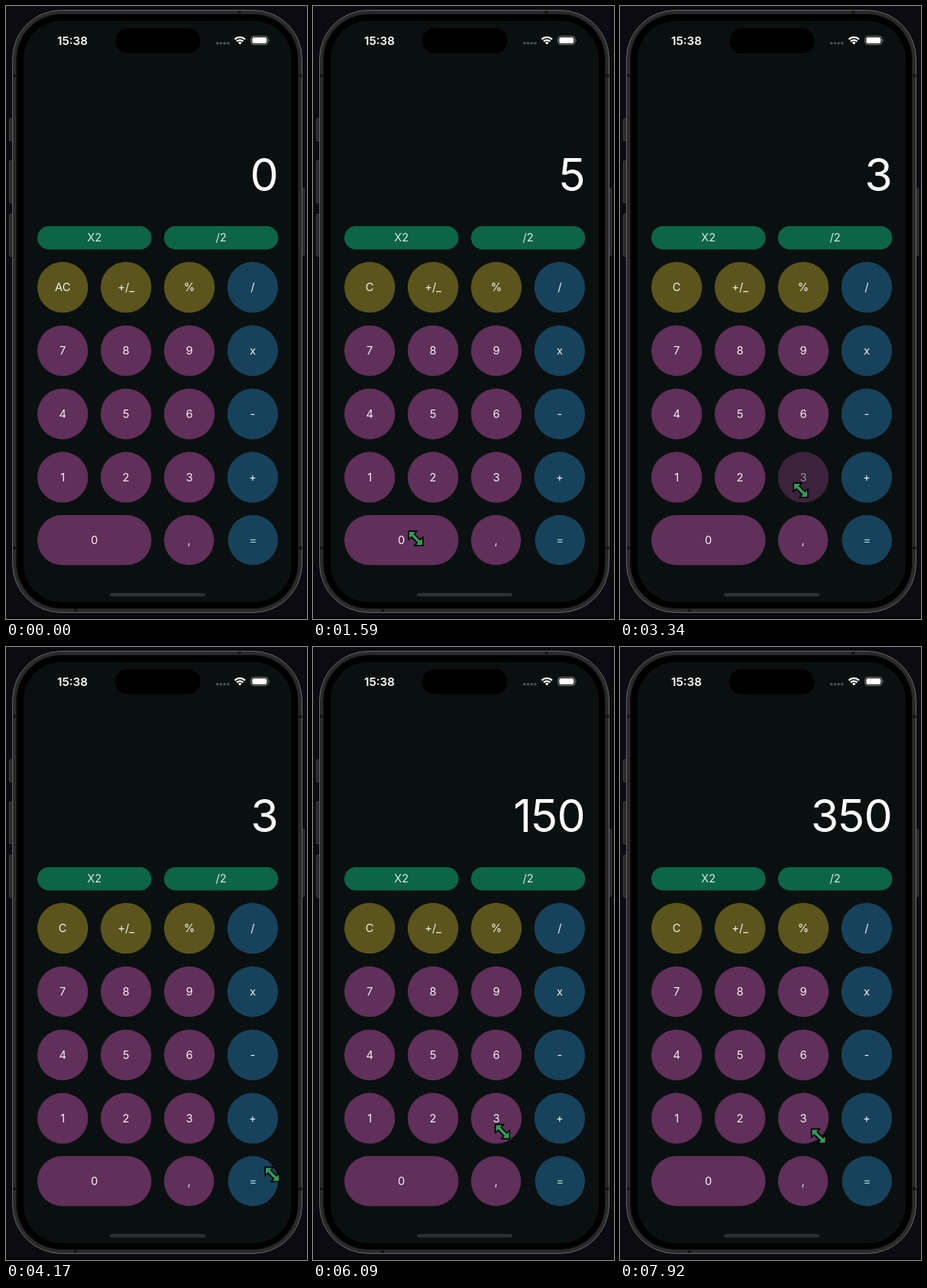
An HTML page for the animation above (8 s loop, 394x802 px).

```html
<!DOCTYPE html>
<html lang="en">
<head>
<meta charset="utf-8">
<title>Calculator</title>
<style>
  html, body { margin: 0; width: 100%; height: 100%; overflow: hidden; background: #0b0b11; }
  svg { display: block; width: 394px; height: 802px; font-family: Inter, Roboto, sans-serif; }
  .key text { font-size: 14.7px; text-anchor: middle; }
  #out { font-size: 59px; letter-spacing: -.8px; text-anchor: end; fill: #fff; }
</style>
</head>
<body>
<svg viewBox="0 0 394 802">
  <rect width="394" height="802" fill="#0b0b11"/>
  <rect y="798" width="394" height="4" fill="#07070a"/>

  <g fill="#29292a" stroke="#4a4a4b" stroke-width=".8">
    <rect x="4.4" y="147.4" width="5" height="29" rx="1"/>
    <rect x="4.4" y="202.4" width="5" height="55" rx="1"/>
    <rect x="4.4" y="272.4" width="5" height="55" rx="1"/>
    <rect x="386" y="238.4" width="4.6" height="88" rx="1"/>
  </g>
  <rect x="8.5" y="5.5" width="379" height="788" rx="64" fill="#2a2a2b" stroke="#666667"/>
  <path d="M9 91h5M382.500 91h5M9 709h5M382.500 709h5M305.500 6v5M91 789v4" stroke="#151516" stroke-width="4"/>
  <rect x="13.5" y="10.500" width="369" height="778" rx="59" fill="#000" stroke="#1b1b1c"/>
  <rect x="23" y="19.500" width="351" height="760.500" rx="50" fill="#0a100f"/>
  <rect x="143" y="29" width="111.500" height="33" rx="16.500" fill="#000"/>

  <text x="87" y="50.700" font-size="15.2" font-weight="600" text-anchor="middle" fill="#fff">15:38</text>
  <g fill="#505454">
    <circle cx="276.700" cy="48.800" r="1.800"/><circle cx="281.400" cy="48.800" r="1.800"/>
    <circle cx="286.100" cy="48.800" r="1.800"/><circle cx="290.800" cy="48.800" r="1.800"/>
  </g>
  <g fill="none" stroke="#fff" stroke-width="2.300">
    <path d="M299.500 43.600a9.500 9.500 0 0 1 13.400 0M302 46.400a6 6 0 0 1 8.400 0"/>
    <path d="M303.900 47.900a3.400 3.400 0 0 1 4.600 0L306.200 50.500z" fill="#fff" stroke="none"/>
  </g>
  <rect x="320.700" y="39.500" width="22.300" height="11" rx="3.500" fill="none" stroke="#7d8180"/>
  <rect x="322.300" y="41.100" width="19" height="7.800" rx="2.200" fill="#fff"/>
  <path d="M344.200 43.300q1.700 1.700 0 3.500z" fill="#7d8180"/>

  <text id="out" x="356" y="242"></text>
  <g id="keys"></g>
  <rect x="136" y="768" width="125" height="4.500" rx="2.250" fill="#2d3030"/>
  <path id="cursor" fill="#2f9f58" stroke="#000" stroke-width="3.400" paint-order="stroke"
    d="M-8.500-8.500h8l-2.500 3L5.500 3l3-2.500v8h-8l2.500-3L-5.500-3l-3 2.500z"/>
</svg>
<script>
const NS = 'http://www.w3.org/2000/svg';
const $ = id => document.getElementById(id);
const LOOP = 8000, STEP = 1000 / 12;
const GREEN = '#0b6546', OLIVE = '#5b551c', PURPLE = '#602f5a', BLUE = '#17425c';
const keys = {};

function add(parent, tag, attrs) {
  const el = document.createElementNS(NS, tag);
  for (const k in attrs) el.setAttribute(k, attrs[k]);
  return parent.appendChild(el);
}

function key(label, x, y, width, height, fill, ink = '#f4f1f4') {
  const g = add($('keys'), 'g', { class: 'key' });
  add(g, 'rect', { x, y, width, height, rx: height / 2, fill });
  const text = add(g, 'text', { x: x + width / 2, y: y + height / 2 + 5.2, fill: ink });
  text.textContent = label;
  keys[label] = { g, text };
}

const colX = c => 41 + c * 82.9;
key('X2', 41, 288, 149.500, 30.500, GREEN, '#dce9e3');
key('/2', 206.800, 288, 149.500, 30.500, GREEN, '#dce9e3');
[['AC', '+/_', '%', '/'], ['7', '8', '9', 'x'], ['4', '5', '6', '-'], ['1', '2', '3', '+']].forEach((row, r) =>
  row.forEach((label, c) =>
    key(label, colX(c), 334.800 + r * 82.850, 66.400, 66.400, c === 3 ? BLUE : r ? PURPLE : OLIVE)));
key('0', 41, 666, 149.500, 65.500, PURPLE);
key(',', 206.800, 666, 65.500, 65.500, PURPLE);
key('=', 290.500, 666, 65.500, 65.500, BLUE, '#a5e6cf');

// Cursor legs: start, end, x, y
const legs = [
  [583, 583, 262, 16],
  [583, 1000, 174, 552],
  [1330, 1583, 134.500, 696.500],
  [2083, 2417, 333.500, 469],
  [2833, 3083, 236.500, 633.500],
  [3667, 4083, 348.500, 690],
  [5083, 5333, 330, 632],
  [5750, 6083, 248, 634],
  [6500, 6833, 176, 554],
  [7167, 7417, 134.500, 697],
  [7667, 7917, 260, 640]
];

// Taps: key, down, up, resulting display
const taps = [
  ['5', 1000, 1160, '5'], ['0', 1667, 1830, '50'], ['x', 2583, 2740, '50'],
  ['3', 3167, 3270, '3'], ['=', 4300, 4410, '150'], ['+', 5410, 5570, '150'],
  ['3', 6160, 6320, '3'], ['5', 6960, 7080, '35'], ['0', 7440, 7570, '350']
];

const ease = p => p * p * (3 - 2 * p);
const clamp = p => Math.min(1, Math.max(0, p));

function cursorAt(t) {
  let [, , x, y] = legs[0];
  for (const [from, to, tx, ty] of legs.slice(1)) {
    if (t < from) break;
    const p = ease(clamp((t - from) / (to - from)));
    x += (tx - x) * p;
    y += (ty - y) * p;
  }
  return [x, y];
}

function render(t) {
  let shown = '0';
  for (const k in keys) keys[k].g.setAttribute('opacity', 1);
  for (const [k, down, up, value] of taps) {
    if (t < down) break;
    if (t >= up) shown = value;
    const alpha = t < up ? .45 : .45 + .55 * clamp((t - up) / 260);
    keys[k].g.setAttribute('opacity', alpha);
  }
  $('out').textContent = shown;
  keys.AC.text.textContent = shown === '0' ? 'AC' : 'C';
  $('cursor').setAttribute('transform', `translate(${cursorAt(t)})`);
  $('cursor').setAttribute('visibility', t < legs[0][0] ? 'hidden' : 'visible');
}

const start = performance.now();
function tick() {
  const t = (performance.now() - start) % LOOP;
  render(Math.floor(t / STEP) * STEP + 1);
  requestAnimationFrame(tick);
}
tick();
</script>
</body>
</html>
```
